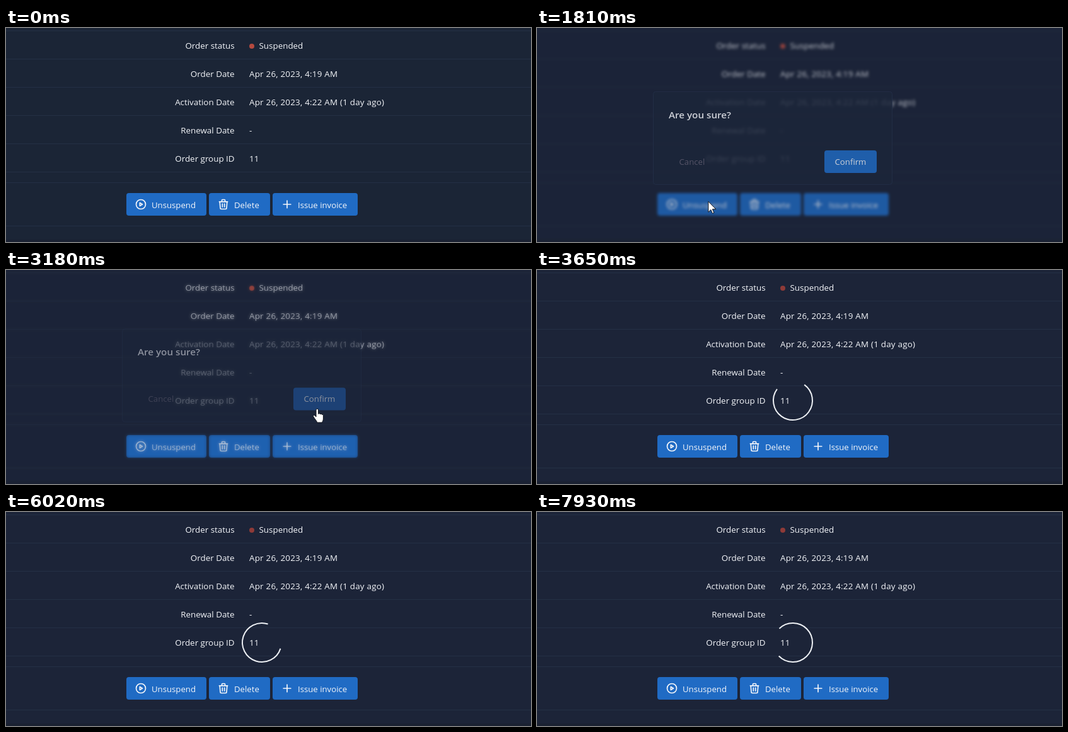
These frames come from a looping animation (833 by 341 pixels, 8 s). An HTML page:

```html
<!DOCTYPE html>
<html lang="en">
<head>
<meta charset="utf-8">
<title>Order status</title>
<style>
  html, body { margin: 0; height: 100%; overflow: hidden; background: #1b2536; }
  svg { display: block; width: 833px; height: 341px; }
  text { font: 13.4px "Open Sans", "Noto Sans", sans-serif; fill: #f4f6fa; }
  .label { text-anchor: end; }
  .date { letter-spacing: .22px; }
  .btn text, #modal text { font-size: 13.2px; }
  #modal .title { font-size: 15.2px; font-weight: 600; }
  #modal .cancel { fill: #625f72; }
  .btn rect { fill: #206bc4; }
  .icon { fill: none; stroke: #f4f6fa; stroke-width: 2; stroke-linecap: round; stroke-linejoin: round; }
  #cursor path { fill: #fff; stroke: #10131a; stroke-width: 1; stroke-linejoin: round; }
</style>
</head>
<body>
<svg viewBox="0 0 833 341">
  <defs>
    <filter id="blur" filterUnits="userSpaceOnUse" x="-20" y="-20" width="873" height="381" color-interpolation-filters="sRGB">
      <feGaussianBlur stdDeviation="2"/>
    </filter>
  </defs>
  <g id="page">
    <rect id="card" x="-20" y="-20" width="873" height="381"/>
    <rect x="-20" y="337" width="873" height="30" fill="#1a2132"/>
    <path d="M-20 4.5H853M-20 49.5H853M-20 94.5H853M-20 139.5H853M-20 184.5H853M-20 229.5H853M-20 246.5H853M-20 315.5H853" stroke="#243045"/>
    <g id="rows"></g>
    <circle id="dot" cx="390" cy="29" r="4"/>
    <g class="btn">
      <rect id="unsuspend" x="191" y="263" width="127" height="36" rx="4"/>
      <g class="icon" transform="translate(204 271) scale(.8333)">
        <circle cx="12" cy="12" r="9"/><path d="M10 9v6l5-3z"/>
      </g>
      <text x="231" y="287">Unsuspend</text>
      <rect x="322" y="263" width="97" height="36" rx="4"/>
      <path class="icon" transform="translate(335 271) scale(.8333)" d="M4 7h16M10 11v6M14 11v6M5 7l1 12a2 2 0 0 0 2 2h8a2 2 0 0 0 2-2l1-12M9 7V4a1 1 0 0 1 1-1h4a1 1 0 0 1 1 1v3"/>
      <text x="362" y="287">Delete</text>
      <rect x="423" y="263" width="135" height="36" rx="4"/>
      <path class="icon" transform="translate(436 271) scale(.8333)" d="M12 5v14M5 12h14"/>
      <text x="463" y="287">Issue invoice</text>
    </g>
  </g>
  <g id="backdrop">
    <use href="#page" filter="url(#blur)"/>
    <rect width="833" height="341" fill="#1c2438" opacity=".24"/>
  </g>
  <g id="modal">
    <rect x="184.5" y="101.5" width="379" height="148" rx="4" fill="#1c263a" stroke="#243049"/>
    <text class="title" x="209" y="144">Are you sure?</text>
    <text class="cancel" x="225.5" y="218">Cancel</text>
    <rect id="confirm" x="456" y="195" width="83" height="36" rx="4"/>
    <text x="472.5" y="218">Confirm</text>
  </g>
  <path id="spinner" d="M31 0A31 31 0 1 1 0 -31" fill="none" stroke="#eef1f5" stroke-width="2"/>
  <g id="cursor">
    <path id="arrow" d="M0 0V17L4 13.2L6.5 19L9 18L6.5 12.3H12Z"/>
    <path id="hand" d="M-2 2a1.8 1.8 0 0 1 3.6 0V8.5a1.6 1.6 0 0 1 3 .4a1.6 1.6 0 0 1 2.8 .6a1.4 1.4 0 0 1 2 1.3V16C9.4 19 8 20 7.6 22H-.4C-1 19-4 16.5-6 13c-1.4-2.2 .8-3.4 2.3-1.8L-2 13Z"/>
  </g>
</svg>
<script>
const $ = id => document.getElementById(id);
const set = (id, name, value) => $(id).setAttribute(name, value);
const show = (id, on) => set(id, "visibility", on ? "visible" : "hidden");

const rows = [
  ["Order status", "Suspended", 401.5],
  ["Order Date", "Apr 26, 2023, 4:19 AM", 386],
  ["Activation Date", "Apr 26, 2023, 4:22 AM (1 day ago)", 386],
  ["Renewal Date", "-", 386],
  ["Order group ID", "11", 386],
];
$("rows").innerHTML = rows.map(([label, value, x], i) => {
  const y = 33 + 45 * i;
  return `<text class="label" x="362.6" y="${y}">${label}</text>` +
    `<text class="${value.startsWith("Apr") ? "date" : ""}" x="${x}" y="${y}">${value}</text>`;
}).join("");

// Pointer path: time, x, y
const track = [
  [800, 256, 297], [1020, 246, 281], [1720, 246, 281], [2180, 500, 236],
  [2250, 497, 230], [2390, 492, 221], [2790, 492, 221], [2920, 494, 221],
];
const ramp = (t, a, b) => Math.min(1, Math.max(0, (t - a) / (b - a)));
const ease = p => p * p * (3 - 2 * p);
const easeOut = p => 1 - (1 - p) ** 3;

function pointer(t) {
  let [, x, y] = track[0];
  for (let i = 1; i < track.length; i++) {
    const p = ease(ramp(t, track[i - 1][0], track[i][0]));
    x += (track[i][1] - track[i - 1][1]) * p;
    y += (track[i][2] - track[i - 1][2]) * p;
  }
  return [x, y];
}

function draw(t) {
  const closed = t >= 3200;
  set("card", "fill", t < 1380 ? "#1b2536" : "#1c2438");
  set("dot", "fill", closed ? "#8e3a38" : "#b54a3f");
  $("unsuspend").style.fill = t >= 800 && t < 1700 ? "#1d5dab" : "#206bc4";
  set("confirm", "fill", t >= 2250 ? "#1f5eae" : "#206bc4");

  set("backdrop", "opacity", ramp(t, 1510, 1750) * (1 - ramp(t, 3070, 3330)));

  const enter = ramp(t, 1590, 1860), leave = ramp(t, 3070, 3300);
  const lift = -16 * (1 - easeOut(enter)) - 16 * ease(leave);
  set("modal", "opacity", enter * (1 - leave));
  set("modal", "transform", `translate(0 ${lift})`);

  const [x, y] = pointer(t), isArrow = t >= 1450 && t < 2250, visible = t >= 800 && !closed;
  set("cursor", "transform", `translate(${x} ${y})`);
  show("arrow", visible && isArrow);
  show("hand", visible && !isArrow);

  // The spinner turns in steps of 32 degrees
  const step = Math.floor((t - 3646) / 65.85);
  show("spinner", closed);
  set("spinner", "transform", `translate(406 208) rotate(${306 + 32 * step})`);
}

function tick() {
  draw(performance.now() % 8000);
  requestAnimationFrame(tick);
}
tick();
</script>
</body>
</html>
```
